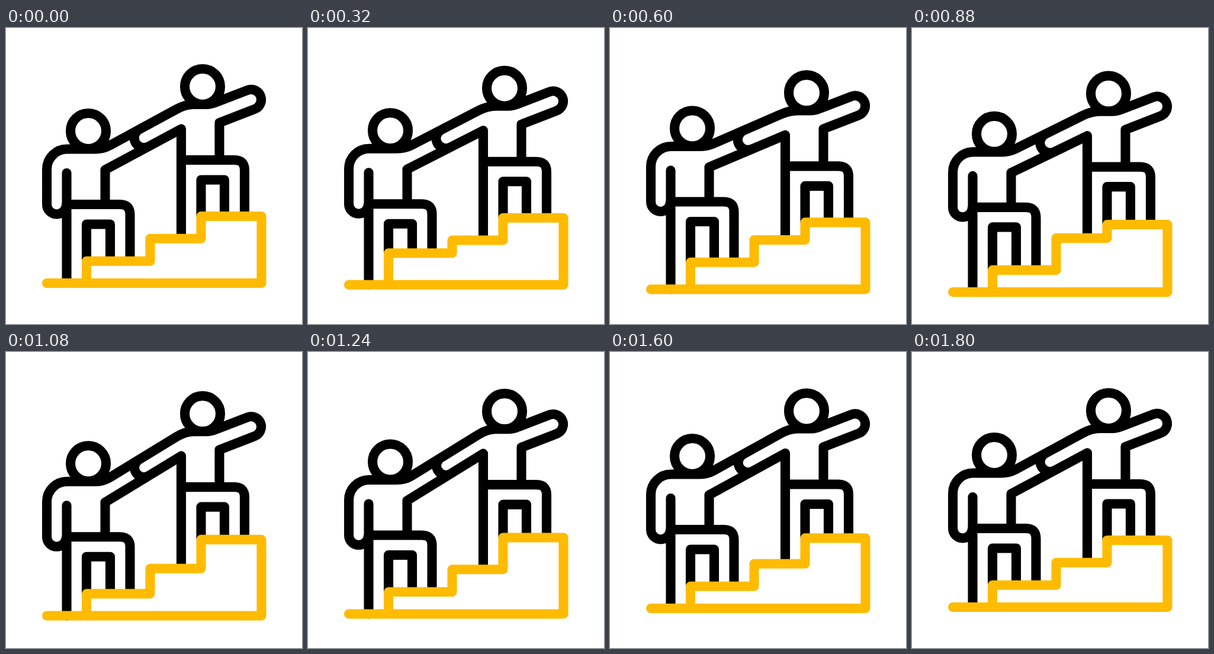
An HTML page for the animation above (1.84 s loop, 500 by 500 pixels).

```html
<!DOCTYPE html>
<html lang="en">
<head>
<meta charset="utf-8">
<title>Helping hand on the stairs</title>
<style>
  html, body { margin: 0; width: 100%; height: 100%; overflow: hidden; background: #fff; }
  svg { display: block; width: 100vw; height: 100vh; }
  path { fill: none; stroke-width: 16.1; stroke-linecap: round; stroke-linejoin: round; }
</style>
</head>
<body>
<svg viewBox="0 0 500 500">
  <path id="people" stroke="#000"/>
  <path id="stairs" stroke="#fb0"/>
</svg>
<script>
const LOOP = 1840, STEP = 40;
const people = document.getElementById('people');
const stairs = document.getElementById('stairs');

const ease = (t, from, to) => {
  const s = Math.min(1, Math.max(0, (t - from) / (to - from)));
  return s * s * (3 - 2 * s);
};
// Rises from a to b, holds until c, falls until d
const pulse = (t, a, b, c, d) => ease(t, a, b) - ease(t, c, d);
const mix = (p, q, k) => [p[0] + (q[0] - p[0]) * k, p[1] + (q[1] - p[1]) * k];
const atX = (p, q, x) => mix(p, q, (x - p[0]) / (q[0] - p[0]))[1];
const head = (x, y) => `M${x - 30} ${y}a30 30 0 1 1 60 0a30 30 0 1 1 -60 0`;

// Hip, outer leg and the inner gap between the legs
const legs = (x, y, outer, in1, in2, foot) =>
  `M${x} ${y}H${outer - 17}Q${outer} ${y} ${outer} ${y + 17}V${foot}` +
  `M${in1} ${foot}V${y + 33.5}H${in2}V${foot}`;

function linkedArms(l, r) {
  const top1 = [164, 204.5 + l], top2 = [303, 129 + r];
  const low1 = [167.5, 239.5 + l], low2 = [296, 170.5 + r];
  const x = 233;
  const up = atX(top1, top2, x), down = atX(low1, low2, x);
  const a = Math.atan2(top2[1] - top1[1], top2[0] - top1[0]);
  const rad = (down - up) / 2 * Math.cos(a);
  const nx = rad * Math.sin(a), ny = -rad * Math.cos(a), y = (up + down) / 2;
  return `M103 ${top1[1]}H150Q${top1} ${mix(top1, top2, .08)}` +
    `L${mix(top1, top2, .89)}Q${top2} 317 ${top2[1]}` +
    `M${low1}L${low2}` +
    `M${x + nx} ${y + ny}A${rad} ${rad} 0 0 0 ${x - nx} ${y - ny}`;
}

function draw(t) {
  const sink = 15.1 * pulse(t, 110, 890, 990, 1780);
  const ground = 431 + sink;
  const step1 = ground - 37.2 - 16.3 * pulse(t, 40, 320, 330, 880);
  const step2 = ground - 75.2 - 16 * pulse(t, 320, 870, 880, 1190);
  const step3 = ground - 113 - 16 * pulse(t, 840, 1100, 1330, 1780);
  const l = sink - 15.8 * pulse(t, 165, 675, 725, 1110);
  const r = sink - 10.5 * pulse(t, 695, 1177, 1210, 1720);

  people.setAttribute('d',
    head(139, 174 + l) + head(332, 99 + r) + linkedArms(l, r) +
    // Lower climber
    `M103 ${204.5 + l}A34 34 0 0 0 69 ${238.5 + l}V${298 + l}A16.5 16.5 0 0 0 102 ${298 + l}` +
    `M102.5 ${245 + l}V${ground}M167.5 ${239.5 + l}V${298 + l}` +
    legs(102.5, 298 + l, 209.5, 136, 176, step1 - 2) +
    // Upper climber
    `M312 ${129 + r}H338Q347 ${129 + r} 356 ${125 + r}L408 ${105 + r}` +
    `A17 17 0 0 1 420 ${137 + r}L360.5 ${160 + r}V${223 + r}` +
    `M296 ${170.5 + r}V${step2 - 2}` +
    legs(296, 223 + r, 403, 329.5, 369, step3 - 2));

  stairs.setAttribute('d',
    `M69 ${ground}H431.5V${step3}H329.5V${step2}H243.5V${step1}H136V${ground}`);
}

const start = performance.now();
function tick() {
  const t = (performance.now() - start) % LOOP;
  draw(Math.floor(t / STEP) * STEP);
  requestAnimationFrame(tick);
}
tick();
</script>
</body>
</html>
```
